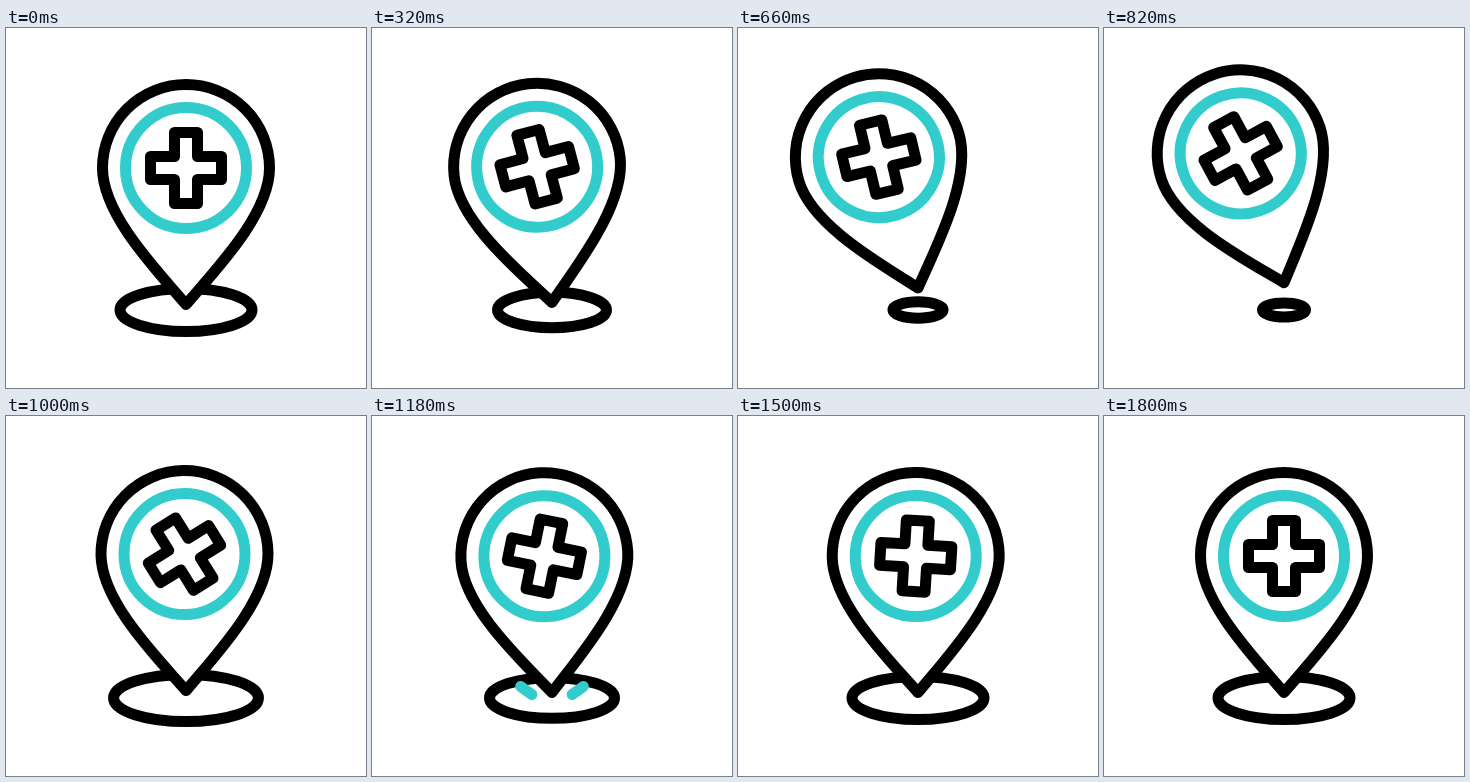
An HTML page for the animation above (2420 ms loop, 360 px wide and 360 px high).

```html
<!DOCTYPE html>
<html lang="en">
<head>
<meta charset="utf-8">
<title>Medical location pin</title>
<style>
  html, body { margin: 0; width: 100%; height: 100%; overflow: hidden; background: #fff; }
  svg { display: block; width: 100vw; height: 100vh; }
  .line { fill: none; stroke: #000; stroke-width: 11; stroke-linecap: round; stroke-linejoin: round; }
  .accent { stroke: #33cccc; }
</style>
</head>
<body>
<svg viewBox="0 0 360 360">
  <ellipse id="ground" class="line" cx="180" cy="282"/>
  <path id="sparks" class="line accent"/>
  <g id="pin">
    <path class="line" style="fill:#fff" d="M180 276.5C151.5 243 96.5 187 96.5 140A83.5 83.5 0 0 1 263.5 140C263.5 187 208.5 243 180 276.5Z"/>
    <circle class="line accent" cx="180" cy="140" r="60.5"/>
    <path id="cross" class="line" d="M-11.5-35.5h23v24h24v23h-24v24h-23v-24h-24v-23h24z"/>
  </g>
</svg>
<script>
const LOOP = 2420, STEP = 20;
const el = id => document.getElementById(id);
const ground = el('ground'), sparks = el('sparks'), pin = el('pin'), cross = el('cross');

const clamp = x => Math.max(0, Math.min(1, x));
const smooth = x => x * x * (3 - 2 * x);
const lateSmooth = x => smooth(x ** 1.75);
const settle = x => 1 - (1 - x ** 1.2) ** 2;
const easeOut = x => 1 - (1 - x) ** 2;

// Keys are [time, value, easing towards this key].
function track(time, keys) {
  let value = keys[0][1];
  for (let i = 1; i < keys.length; i++) {
    const [start, from] = keys[i - 1];
    const [end, to, ease = smooth] = keys[i];
    if (time >= start) value = from + (to - from) * ease(clamp((time - start) / (end - start)));
  }
  return value;
}

const LEAN = [[0, 0], [820, -18.5], [1070, 3.6], [1180, -3.2], [1800, 0, settle]];
const LIFT = [[0, 0], [820, 21.7, lateSmooth], [1040, 0]];
const SPIN = [[216, 0], [792, -100], [820, -100], [1070, -15], [1180, 14.7], [1800, 0, settle]];
const SIZE = [[90, 1], [780, 0.326], [820, 0.326], [1070, 1.28], [1180, 0.947], [1440, 1]];

function drawSparks(time) {
  const visible = time >= 1140 && time < 1420;
  sparks.style.display = visible ? '' : 'none';
  if (!visible) return;
  const head = 20 + 40 * easeOut(clamp((time - 1140) / 260));
  const tail = 20 + 40 * smooth(clamp((time - 1170) / 250));
  const ray = side => `M${180 + side * tail} ${293 - 0.72 * tail}L${180 + side * head} ${293 - 0.72 * head}`;
  sparks.setAttribute('d', ray(-1) + ray(1));
}

function draw(time) {
  const size = track(time, SIZE);
  ground.setAttribute('rx', 66 * size);
  ground.setAttribute('ry', 21.5 * size);
  pin.setAttribute('transform', `translate(0 ${-track(time, LIFT)}) rotate(${track(time, LEAN)} 180 276.5)`);
  cross.setAttribute('transform', `translate(180 140) rotate(${track(time, SPIN)})`);
  drawSparks(time);
}

const began = performance.now();
function tick() {
  const time = (performance.now() - began) % LOOP;
  draw(Math.floor(time / STEP) * STEP);
  requestAnimationFrame(tick);
}
tick();
</script>
</body>
</html>
```
